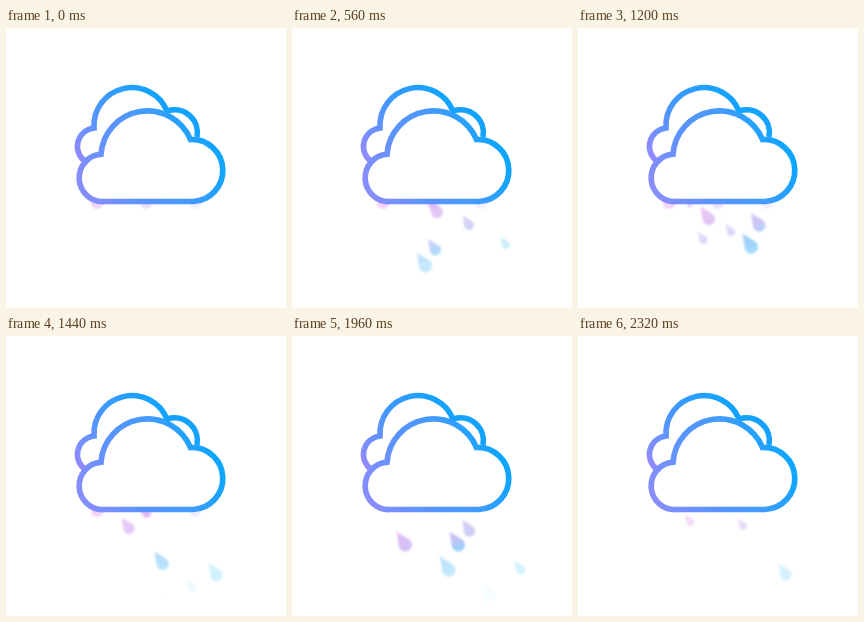
An HTML page with a canvas for the animation above (2360 ms loop, 280 px wide and 280 px high).

```html
<!DOCTYPE html>
<html>
<head>
<meta charset="utf-8">
<style>
html, body { margin: 0; height: 100%; overflow: hidden; background: #fff; }
canvas { display: block; }
</style>
</head>
<body>
<canvas id="stage" width="280" height="280"></canvas>
<script>
const LOOP = 2360, STEP = 40, BASE = 177, SLANT = 0.7, TILT = 0.58;
const ctx = document.getElementById('stage').getContext('2d');

function gradient(x0, y0, x1, y1, stops) {
  const g = ctx.createLinearGradient(x0, y0, x1, y1);
  for (const at in stops) g.addColorStop(at, stops[at]);
  return g;
}

const backInk = gradient(69, 135, 150, 70, { 0: '#9a88ff', 0.5: '#4a96fd', 1: '#14a2ff' });
const frontInk = gradient(72, 165, 205, 105, { 0: '#8c8cfc', 0.35: '#5c93fc', 0.65: '#459afd', 1: '#0ca6ff' });
const rainInk = gradient(90, BASE, 127, 260, { 0: '#eea4f0', 0.35: '#cfa0f2', 0.6: '#a6a6f3', 0.7: '#68b6f8', 1: '#7cd8fc' });

const backCloud = new Path2D('M80 134A18.5 18.5 0 0 1 88 100A38 38 0 0 1 161 83A23 23 0 0 1 191 109');
const frontCloud = new Path2D('M98 173.5A23.7 23.7 0 0 1 95 126.2A46.6 46.6 0 0 1 184.5 111.5A31 31 0 0 1 187 173.5Z');

// A shower lets drops go one after another, each a step further along the cloud.
const drops = [];
function shower(start, pull, x, count = 1, step = 0, lag = 0) {
  for (let i = 0; i < count; i++) {
    drops.push({ start: start + i * lag, pull, x: x + i * step });
  }
}
shower(170, 4, 91, 2, 21, 55);
shower(244, 4, 186, 3, -23, 92);
shower(722, 4, 92);
shower(742, 2, 144, 2, -23, 193);
shower(782, 2, 101, 3, 33, 50);
shower(1190, 2.5, 112, 2, 28, 195);
shower(1545, 1.85, 91, 2, 53);
shower(1545, 3.3, 117, 2, 72);
shower(1536, 1, 165);
shower(2065, 2, 156, 2, -50, 43);

// Drops swell most under evenly spaced spouts.
const sizeAt = x => 5.2 + 1.5 * Math.cos((x - 91) / 26.5 * 2 * Math.PI);

function drawDrop({ start, pull, x: x0 }, t) {
  const s = (t - start) / 100, fall = pull * s * s;
  const x = x0 + SLANT * fall, y = BASE + fall;
  const fade = Math.min(1, (266 - y) / 48);
  if (s <= 0 || fade <= 0) return;
  const size = sizeAt(x0), r = size * Math.min(1, 0.4 + s / 2), tip = 2.4 * r;
  ctx.globalAlpha = 0.1 * size * fade;
  ctx.beginPath();
  ctx.moveTo(x - tip * Math.sin(TILT), y - tip * Math.cos(TILT));
  ctx.arc(x, y, r, -0.44 - TILT, Math.PI + 0.44 - TILT);
  ctx.fill();
}

// Beads cling to the cloud, fainter towards the right.
function drawBeads() {
  for (let i = 0; i < 3; i++) {
    ctx.globalAlpha = 0.5 - 0.15 * i;
    ctx.beginPath();
    ctx.arc(91 + 49 * i, BASE - 2, 6, 0, 7);
    ctx.fill();
  }
}

function drawCloud(path, ink, width) {
  ctx.globalAlpha = 1;
  ctx.fillStyle = '#fff';
  ctx.fill(path);
  ctx.strokeStyle = ink;
  ctx.lineWidth = width;
  ctx.stroke(path);
}

function draw(t) {
  ctx.clearRect(0, 0, 280, 280);
  drawCloud(backCloud, backInk, 5.6);
  ctx.filter = 'blur(1px)';
  ctx.fillStyle = rainInk;
  if (t < 1600) drawBeads();
  drops.forEach(drop => drawDrop(drop, t));
  ctx.filter = 'none';
  drawCloud(frontCloud, frontInk, 5.7);
}

function frame() {
  const t = performance.now() % LOOP;
  draw(t < 2 * STEP ? 0 : Math.floor(t / STEP) * STEP);
  requestAnimationFrame(frame);
}
frame();
</script>
</body>
</html>
```
